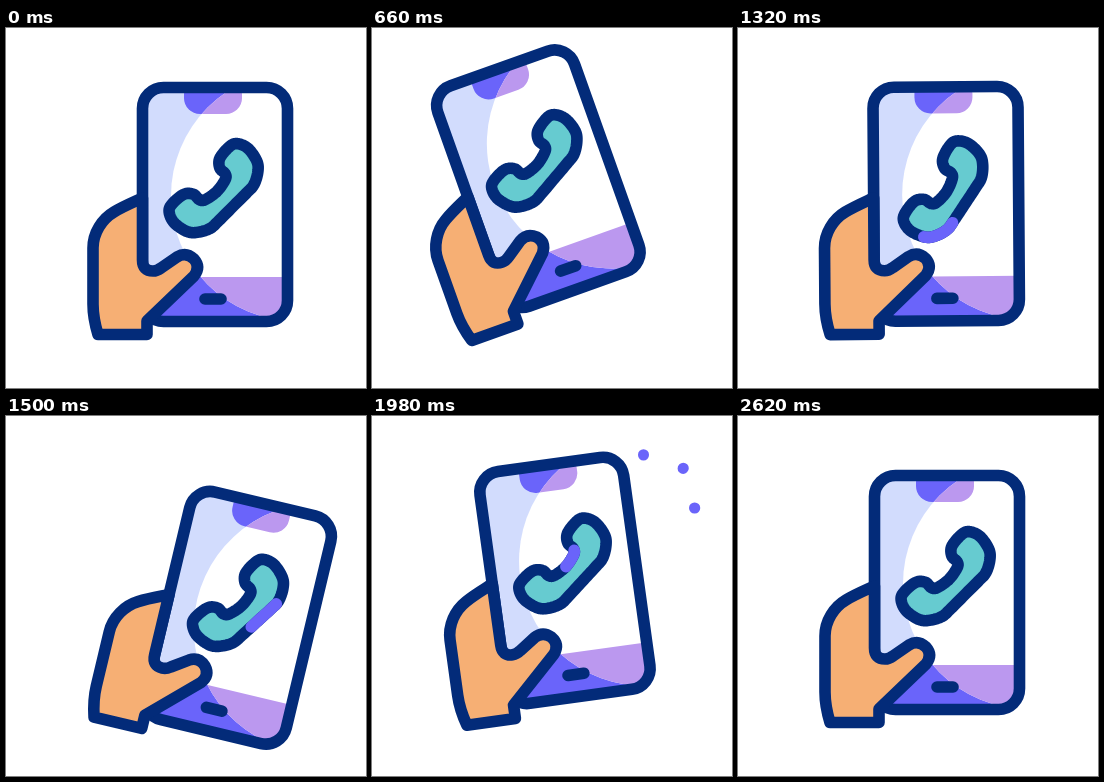
An HTML page with a canvas that plays this animation: 360 px wide and 360 px high, repeating every 2920 ms.

```html
<!DOCTYPE html>
<html lang="en">
<head>
<meta charset="utf-8">
<title>Ringing phone</title>
<style>
  html, body { margin: 0; width: 100%; height: 100%; overflow: hidden; background: #fff; }
  canvas { display: block; width: 100vw; height: 100vh; }
</style>
</head>
<body>
<canvas id="stage" width="360" height="360"></canvas>
<script>
const ctx = document.getElementById('stage').getContext('2d');
const LOOP = 2920;
const NAVY = '#032b79', VIOLET = '#6a64fa', LILAC = '#bb98ef',
      PALE = '#d2dcfd', SKIN = '#f6af74', TEAL = '#66cbd0';
const STROKE = 11.6;
const PIVOT = [113, 287];
const CALL = [207, 159.5], CALL_PIVOT = [216, 172], CALL_SCALE = 0.975;

// Keys are [time, degrees counter-clockwise]
const TILT = [[200, 0], [465, 19.3], [1000, 20.3], [1605, -16], [2000, 8], [2400, -5.8], [2620, 0]];
const SHAKE = [[200, 0], [800, -17], [1000, -17], [1400, 14], [1800, -7], [2400, 0]];

const clamp = (v, lo, hi) => Math.min(hi, Math.max(lo, v));
const ease = x => (1 - Math.cos(Math.PI * clamp(x, 0, 1))) / 2;
const ramp = (t, from, to) => ease((t - from) / (to - from));

function valueAt(keys, t) {
  let value = keys[0][1];
  for (let i = 1; i < keys.length; i++) {
    const [t0, v0] = keys[i - 1], [t1, v1] = keys[i];
    if (t >= t0) value = v0 + (v1 - v0) * ramp(t, t0, t1);
  }
  return value;
}

function rotateAround([x, y], degrees) {
  ctx.translate(x, y);
  ctx.rotate(-degrees * Math.PI / 180);
  ctx.translate(-x, -y);
}

// Closed Catmull-Rom curve sampled as a polyline
function smooth(points, steps = 8) {
  const n = points.length, out = [];
  for (let i = 0; i < n; i++) {
    const [a, b, c, d] = [-1, 0, 1, 2].map(k => points[(i + k + n) % n]);
    for (let s = 0; s < steps; s++) {
      const u = s / steps;
      out.push([0, 1].map(k => b[k] + 0.5 * u * (c[k] - a[k] +
        u * (2 * a[k] - 5 * b[k] + 4 * c[k] - d[k] +
        u * (3 * (b[k] - c[k]) + d[k] - a[k])))));
    }
  }
  return [...out, out[0]];
}

// One half of the receiver; the other half mirrors it across the diagonal
const half = [[-8, 12.5], [-14, 12.5], [-20, 7], [-30, 7], [-42, 17], [-45, 25],
              [-40, 36], [-27, 45], [-16, 46], [-3, 42], [6, 34]];
const mirrored = half.map(([x, y]) => [y, x]).reverse();
const receiver = smooth([[4, 4], ...half, [20, 20], ...mirrored])
  .map(([x, y]) => [x * CALL_SCALE + CALL[0], y * CALL_SCALE + CALL[1]]);
const receiverPath = new Path2D('M' + receiver.map(p => p.join(' ')).join('L') + 'Z');

const handPath = new Path2D(`M136.5 170 C128 174 118 178 108 184 C96 191 87 205 87 220
  V276 Q87 290 92 306.5 H141 V293 L188 248 Q195 239 188 231 Q180 223.500 171 229
  L155 240 Q151 243 147 243 Q136.500 243 136.500 232 Z`);

const phonePath = new Path2D();
phonePath.roundRect(136.5, 59.5, 145, 234, 21);
const notchPath = new Path2D();
notchPath.roundRect(178, 50, 58, 36, 16);
const glowPath = new Path2D();
glowPath.arc(290, 168, 125, 0, Math.PI * 2);

function fill(path, color) {
  ctx.fillStyle = color;
  ctx.fill(path);
}

function outline(path) {
  ctx.strokeStyle = NAVY;
  ctx.lineWidth = STROKE;
  ctx.stroke(path);
}

function line(x0, y0, x1, y1, color, width) {
  ctx.strokeStyle = color;
  ctx.lineWidth = width;
  ctx.beginPath();
  ctx.moveTo(x0, y0);
  ctx.lineTo(x1, y1);
  ctx.stroke();
}

function screenColors(back, accent) {
  ctx.fillStyle = back;
  ctx.fillRect(130, 50, 160, 250);
  ctx.fillStyle = accent;
  ctx.fillRect(130, 249, 160, 50);
  fill(notchPath, accent);
}

function drawScreen() {
  ctx.save();
  ctx.clip(phonePath);
  screenColors(PALE, VIOLET);
  ctx.clip(glowPath);
  screenColors('#fff', LILAC);
  ctx.restore();
  outline(phonePath);
  line(199, 271, 215, 271, NAVY, STROKE);
}

// Violet stretch of the receiver outline between two distances
function drawRunner(tail, head) {
  if (head - tail < 0.5) return;
  let walked = 0;
  ctx.beginPath();
  for (let i = 1; i < receiver.length; i++) {
    const [x0, y0] = receiver[i - 1], [x1, y1] = receiver[i];
    const size = Math.hypot(x1 - x0, y1 - y0);
    const from = clamp((tail - walked) / size, 0, 1);
    const to = clamp((head - walked) / size, 0, 1);
    if (to > from) {
      ctx.moveTo(x0 + (x1 - x0) * from, y0 + (y1 - y0) * from);
      ctx.lineTo(x0 + (x1 - x0) * to, y0 + (y1 - y0) * to);
    }
    walked += size;
  }
  ctx.strokeStyle = VIOLET;
  ctx.lineWidth = STROKE;
  ctx.stroke();
}

function drawReceiver(t) {
  ctx.save();
  rotateAround(CALL_PIVOT, valueAt(SHAKE, t));
  fill(receiverPath, TEAL);
  outline(receiverPath);
  const tail = (t - 1000) * 0.277;
  drawRunner(Math.max(0, tail), Math.max(0, tail + 34));
  ctx.restore();
}

function drawRays(t) {
  const head = ramp(t, 1960, 2200), tail = ramp(t, 2160, 2480);
  if (head - tail < 0.01) return;
  [[90, 67], [45, 70], [0, 65]].forEach(([degrees, reach]) => {
    const a = degrees * Math.PI / 180;
    const at = part => {
      const r = reach - 14 * (1 - part);
      return [271.5 + r * Math.cos(a), 92 - r * Math.sin(a)];
    };
    line(...at(tail), ...at(head), VIOLET, 11);
  });
}

function draw(t) {
  ctx.fillStyle = '#fff';
  ctx.fillRect(0, 0, 360, 360);
  ctx.lineCap = ctx.lineJoin = 'round';
  ctx.save();
  rotateAround(PIVOT, valueAt(TILT, t));
  drawScreen();
  drawReceiver(t);
  fill(handPath, SKIN);
  outline(handPath);
  ctx.restore();
  drawRays(t);
}

const start = performance.now();
function tick() {
  draw((performance.now() - start) % LOOP);
  requestAnimationFrame(tick);
}
tick();
</script>
</body>
</html>
```
